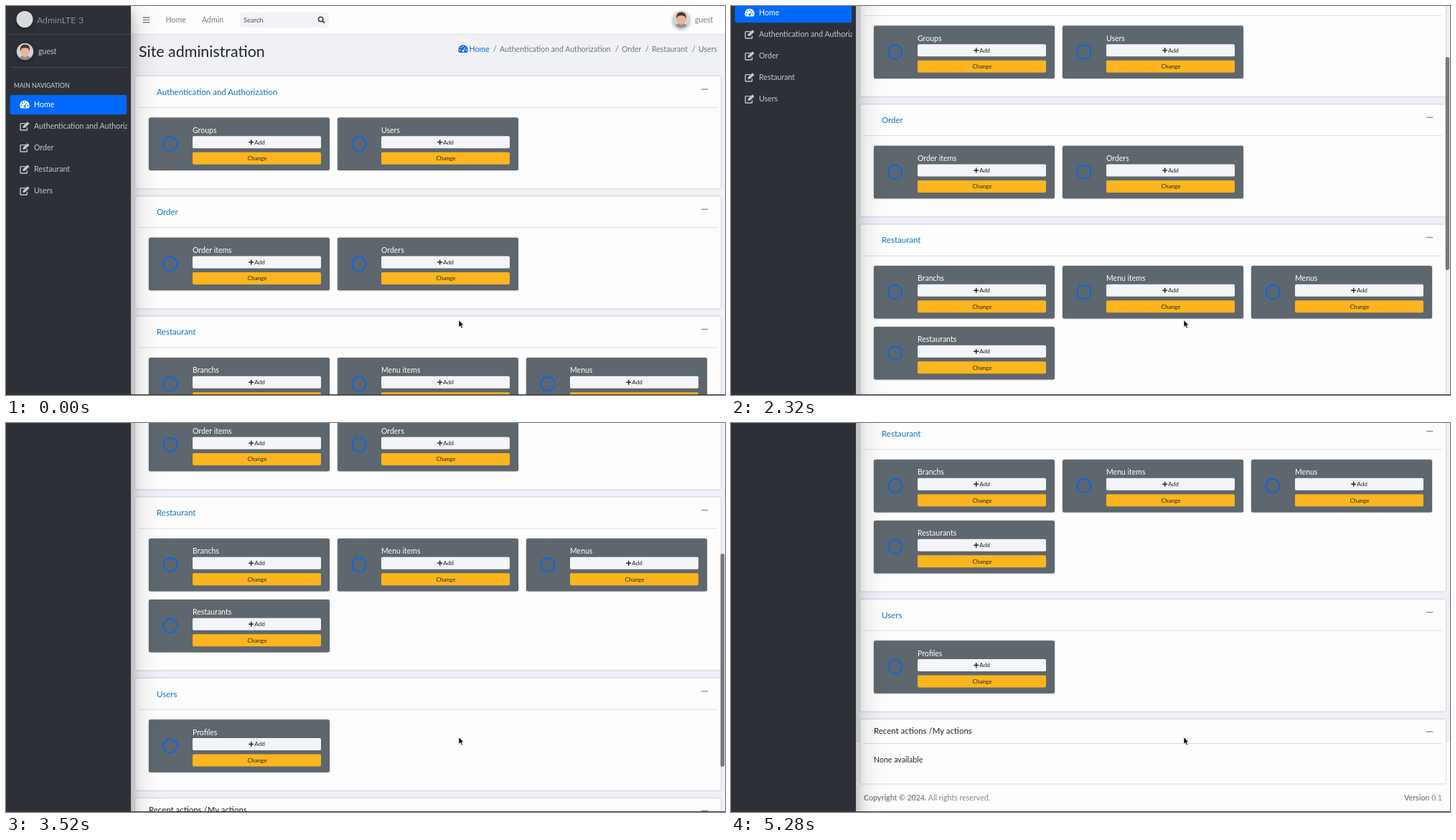
These frames come from a looping animation (1002x542 px, 5360 ms). An HTML page:

```html
<!DOCTYPE html>
<html lang="en">
<head>
<meta charset="utf-8">
<title>Site administration</title>
<style>
  html, body { margin: 0; width: 100%; height: 100%; overflow: hidden; background: #fdfdfd; }
  svg { position: absolute; left: 0; top: 0; display: block; }
  text { font-family: Lato, "Open Sans", sans-serif; white-space: pre; }
  .card { fill: #fdfdfd; filter: drop-shadow(0 .7px 1.1px rgba(0,0,0,.3)); }
  .box { fill: #5e676e; filter: drop-shadow(0 .7px 1px rgba(0,0,0,.3)); }
  .disc { filter: drop-shadow(0 2px 2.5px rgba(0,0,0,.35)); }
  .far { filter: drop-shadow(0 10px 20px rgba(0,0,0,.25)); }
  .near { filter: drop-shadow(0 7px 7px rgba(0,0,0,.22)); }
</style>
</head>
<body>
<svg width="1002" height="542" viewBox="0 0 1002 542">
  <defs>
    <clipPath id="round"><circle r="11.7"/></clipPath>
    <clipPath id="menu"><rect width="168.5" height="981"/></clipPath>
    <g id="avatar">
      <circle class="disc" r="11.7" fill="#d6d3cf"/>
      <g clip-path="url(#round)">
        <path d="M-10 12Q-9 6 0 5.5Q9 6 10 12Z" fill="#8d8f96"/>
        <rect x="-2.5" y="3" width="5" height="5" fill="#dca27f"/>
        <ellipse cy="-.5" rx="6" ry="7.2" fill="#e9b592"/>
        <path d="M-6.6 0Q-8 -10 0 -10Q8 -10 6.6 0L5 -4Q0 -6.5 -5 -4Z" fill="#4b352b"/>
      </g>
    </g>
    <g id="edit" fill="none" stroke="#c2c7d0" stroke-width="1.4">
      <path d="M1.5 -4H-5.2Q-6 -4 -6 -3.2V4.6Q-6 5.4 -5.2 5.4H2.6Q3.4 5.4 3.4 4.6V1.6"/>
      <path d="M-2.6 2.3L-2.2 -.4L3.9 -6.3L6.5 -3.7L.3 2.1Z" fill="#c2c7d0" stroke="none"/>
    </g>
    <g id="gauge">
      <path d="M-5.4 5Q-6.7 3 -6.7 .9A6.7 6.7 0 0 1 6.7 .9Q6.7 3 5.4 5Z" fill="currentColor"/>
      <g fill="var(--hole)">
        <circle cx="-4.4" cy="1.2" r=".9"/><circle cx="-3" cy="-2.2" r=".9"/>
        <circle cy="-3.7" r=".9"/><circle cx="4.4" cy="1.2" r=".9"/>
        <circle cy="2.6" r="1.5"/>
      </g>
      <path d="M.3 2.4L2.9 -2.4" stroke="var(--hole)" stroke-width="1"/>
    </g>
  </defs>
  <g id="page"></g>
  <rect id="thumb" x="995.7" width="5.4" height="297" rx="2.7" fill="#77787b"/>
  <path d="M631 437.6V447.4L633.2 445.4L634.8 449L636.5 448.2L634.9 444.8H638Z"
        fill="#000" stroke="#fff" stroke-width=".7"/>
  <rect y="541" width="1002" height="1" fill="#38393c"/>
</svg>
<script>
const LOOP = 5360, STEP = 80;
const INK = "#212529", LINK = "#0f73c4", MUTED = "#6c757d", PALE = "#c2c7d0";

const text = (x, y, size, fill, str, extra = "") =>
  `<text x="${x}" y="${y}" font-size="${size}" fill="${fill}" ${extra}>${str}</text>`;
const rect = (x, y, w, h, fill, rx = 0, cls = "") =>
  `<rect x="${x}" y="${y}" width="${w}" height="${h}" fill="${fill}" rx="${rx}" class="${cls}"/>`;
const use = (id, x, y, style = "") =>
  `<use href="#${id}" transform="translate(${x} ${y})" style="${style}"/>`;
const minus = y => rect(969, y - .7, 9.2, 1.4, "#93979c", .5);

function tile(x, y, name) {
  return `<g transform="translate(${x} ${y})">` +
    rect(0, 0, 252, 73.5, "#5e676e", 2.5, "box") +
    `<circle cx="30" cy="36.5" r="9.6" fill="none" stroke="#0d66e2" stroke-width="2"/>` +
    text(61, 21.3, 10.5, "#fff", name) +
    rect(61, 25.7, 179, 17, "#f4f5f8", 1.8) +
    `<path d="M139.2 34.1H146.2M142.7 30.6V37.6" stroke="#22262a" stroke-width="1.5"/>` +
    text(147.2, 37.2, 8.2, "#1f2326", "Add") +
    rect(61, 48.1, 179, 17, "#fdb51f", 1.8) +
    text(151, 59.5, 8.15, "#1f2326", "Change", 'text-anchor="middle"') + "</g>";
}

function panel(y, title, names) {
  const rows = Math.ceil(names.length / 3);
  return rect(180, y, 816, 71 + rows * 85, "#fdfdfd", 2.5, "card") +
    text(210, y + 25.8, 11.5, LINK, title) + minus(y + 18) +
    rect(185, y + 43, 806, 1, "#dcdde0") +
    names.map((n, i) => tile(199 + i % 3 * 263, y + 57.6 + Math.floor(i / 3) * 85, n)).join("");
}

function navbar() {
  const grey = "#7b7c7e";
  return rect(174, 0, 828, 39.5, "#fdfdfd") + rect(174, 39, 828, 1, "#dfe1e5") +
    `<path d="M191 16H200.4M191 19.4H200.4M191 22.8H200.4" stroke="${grey}" stroke-width="1.4"/>` +
    text(222.5, 23.4, 10.6, grey, "Home") + text(273, 23.4, 10.6, grey, "Admin") +
    rect(326, 9, 124, 21, "#f1f2f5", 2.5) + text(331, 23, 9.4, "#50565c", "Search") +
    `<g fill="none" stroke="#3f4448"><circle cx="438.6" cy="18.4" r="3.2" stroke-width="1.6"/>` +
    `<path d="M441 20.8L443.8 23.6" stroke-width="2"/></g>` +
    use("avatar", 941, 18.5) + text(960, 23.4, 10.6, grey, "guest");
}

function heading() {
  const crumbs = [[688, "Authentication and Authorization"], [858, "Order"], [900, "Restaurant"], [965, "Users"]];
  return text(185, 71, 21.4, INK, "Site administration") +
    use("gauge", 637, 60, "color:#0a6be0;--hole:#f0f1f6") +
    text(645.6, 63.8, 10.6, "#0a6be0", "Home") +
    crumbs.map(([x, s]) => text(x - 9, 63.8, 10.6, MUTED, "/") + text(x, 63.8, 10.57, MUTED, s)).join("");
}

function recent() {
  return rect(180, 852, 816, 89.5, "#fdfdfd", 2.5, "card") +
    text(199, 871.5, 11.45, INK, "Recent actions /My actions") + minus(869.3) +
    rect(185, 885, 806, 1, "#dcdde0") + text(199, 912, 10.6, INK, "None available");
}

function footer() {
  const tone = "#82898f", bold = s => `<tspan font-weight="700">${s}</tspan>`;
  return text(185, 965, 10.6, tone, bold("Copyright © 2024.") + " All rights reserved.") +
    text(991, 965, 10.6, tone, bold("Version") + " 0.1", 'text-anchor="end"');
}

function sidebar() {
  const dark = "#2d3037";
  const items = ["Authentication and Authorization", "Order", "Restaurant", "Users"];
  return rect(0, 0, 174, 1000, dark, 0, "far") + rect(0, 0, 174, 1000, dark, 0, "near") +
    `<g clip-path="url(#menu)">` +
    `<circle class="disc" cx="26" cy="18.5" r="11.5" fill="#d9dadc"/>` +
    text(43, 23.8, 12.6, "#cfd1d4", "AdminLTE 3", 'font-weight="300"') +
    use("avatar", 26.5, 63.5) + text(45, 66.5, 10.6, PALE, "guest") +
    rect(8, 85, 161, 1, "#454a52") +
    text(11, 113.8, 8.6, "#d0d4db", "MAIN NAVIGATION") +
    rect(5.5, 124, 163, 27.3, "#0069fb", 2.8) +
    use("gauge", 26, 137.5, "color:#fff;--hole:#0069fb") + text(39, 141.2, 10.6, "#fff", "Home") +
    items.map((s, i) => use("edit", 26, 167.6 + i * 30) + text(39, 171.4 + i * 30, 10.6, PALE, s)).join("") +
    "</g>" + rect(0, 39, 174, 1, "#454a52");
}

const page = document.getElementById("page"), thumb = document.getElementById("thumb");
page.innerHTML =
  rect(174, 39, 828, 843, "#f0f1f6") + rect(174, 882, 828, 1, "#dfe1e5") +
  navbar() + heading() +
  panel(98, "Authentication and Authorization", ["Groups", "Users"]) +
  panel(265.2, "Order", ["Order items", "Orders"]) +
  panel(432.5, "Restaurant", ["Branchs", "Menu items", "Menus", "Restaurants"]) +
  panel(684.7, "Users", ["Profiles"]) +
  recent() + footer() + sidebar();

// Scroll positions: [ms, px], joined by a monotone cubic
const stops = [[880, 0], [1120, 25], [1600, 88.5], [2320, 128], [3040, 226], [3840, 390], [4320, 439]];
const rates = stops.slice(1).map(([t, y], i) => (y - stops[i][1]) / (t - stops[i][0]));
const slopes = stops.map((_, i) => {
  const a = rates[i - 1], b = rates[i];
  return a && b ? 2 * a * b / (a + b) : 0;
});

function scrollAt(t) {
  const last = stops.length - 1;
  if (t <= stops[0][0]) return 0;
  if (t >= stops[last][0]) return stops[last][1];
  const i = stops.findIndex(s => s[0] > t) - 1;
  const [t0, y0] = stops[i], [t1, y1] = stops[i + 1], d = t1 - t0, u = (t - t0) / d, v = 1 - u;
  return y0 * (1 + 2 * u) * v * v + slopes[i] * d * u * v * v +
    y1 * u * u * (3 - 2 * u) - slopes[i + 1] * d * u * u * v;
}

function draw(now) {
  const t = Math.floor(now % LOOP / STEP) * STEP;
  const y = Math.round(scrollAt(t) * 2) / 2;
  page.setAttribute("transform", `translate(0 ${-y})`);
  thumb.setAttribute("y", y * .5525 + .3);
  thumb.setAttribute("opacity", t < 960 ? 0 : Math.max(0, Math.min(1, (5040 - t) / 240)));
}

const start = performance.now();
function tick() {
  draw(performance.now() - start);
  requestAnimationFrame(tick);
}
tick();
</script>
</body>
</html>
```
